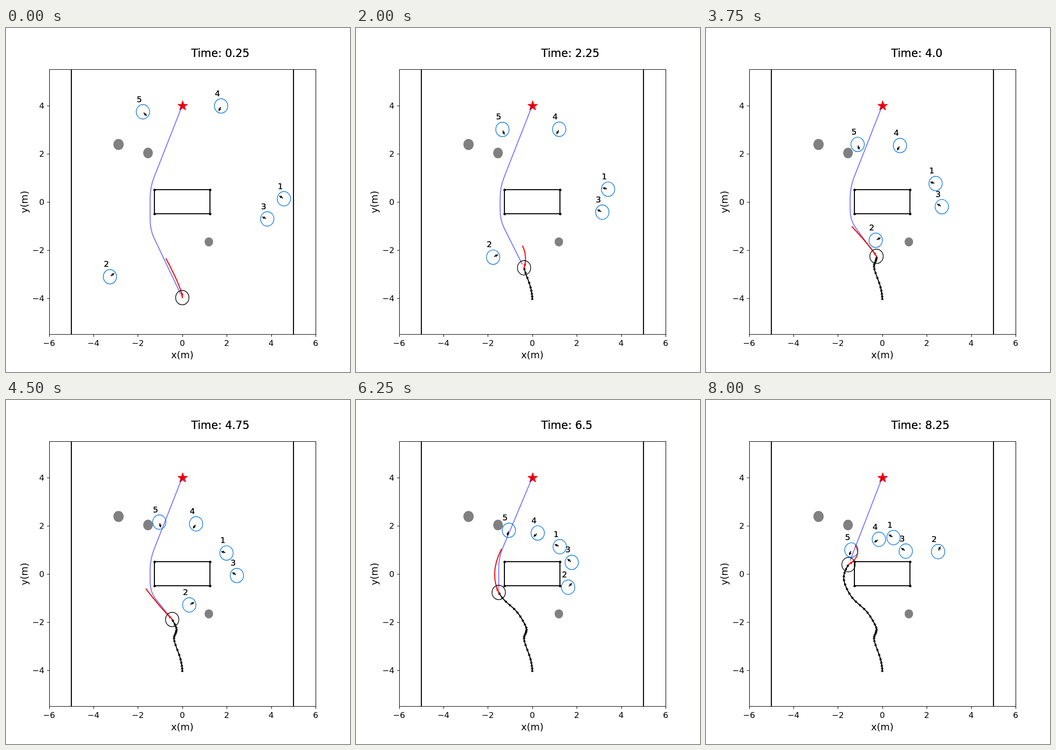
An HTML page that plays this animation: 700x700 px, repeating every 8250 ms.

```html
<!DOCTYPE html>
<html lang="en">
<head>
<meta charset="utf-8">
<title>Path planning</title>
<style>
  html, body { margin: 0; width: 100%; height: 100%; overflow: hidden; background: #fff; }
  svg { display: block; width: 700px; height: 700px; font-family: "DejaVu Sans", sans-serif; }
</style>
</head>
<body>
<svg viewBox="0 0 700 700">
  <g id="back"></g>
  <g id="scene"></g>
</svg>
<script>
const STEP = 250, COUNT = 33;
const SX = 45.208, SY = 49;
const px = x => 358.75 + x * SX;
const py = y => 353.5 - y * SY;
const snap = v => Math.floor(v + 0.5) + 0.5;
const fix = v => +v.toFixed(2);
const GOAL = [px(0), py(4)];
const FONT = 16.67;

// Curves through a few key points; every motion is a smooth spline in time.
const robotSteps = [0, 4, 8, 12, 16, 20, 24, 28, 32];
const robotKeys = [
  [358.8, 548.7], [354.5, 525], [342, 488], [346, 472.5], [345.5, 460.5],
  [327, 430.5], [296, 400.5], [280.3, 364], [290, 335]
];

const walkerSteps = [0, 3, 18, 25, 32];
const walkerKeys = [
  [[565.5, 347.5], [546, 337.3], [448.7, 311.3], [414.6, 298.5], [381.5, 280]],
  [[211.5, 506.2], [232.8, 491], [373, 417], [431.7, 381], [472.3, 308.5]],
  [[531.6, 388.5], [517.2, 382.5], [469.8, 357.2], [439, 330.4], [406.5, 307.5]],
  [[437.7, 158.7], [427.4, 180.5], [386.8, 252], [369.8, 270.6], [351.8, 283.5]],
  [[278.6, 170.5], [289, 184.2], [312, 248.5], [311, 265.2], [295.8, 305.3]]
];

// Bend and end of the planned curve, relative to the robot.
const planSteps = [0, 3, 8, 12, 18, 25, 32];
const planKeys = [
  [-1, -19, -33, -79], [-3, -10, -41, -90], [7, -24, -3, -44], [5, -15, -34, -58.5],
  [-30, -31, -53, -62], [-19, -41, 5.5, -88], [28, -18, 14, -39]
];

function spline(steps, keys, t) {
  const last = steps.length - 1;
  let k = 0;
  while (k < last - 1 && t > steps[k + 1]) k++;
  const d = steps[k + 1] - steps[k], u = (t - steps[k]) / d;
  return keys[k].map((v, j) => {
    const e = keys[k + 1][j] - v;
    const slope = i => (keys[i + 1][j] - keys[i - 1][j]) / (steps[i + 1] - steps[i - 1]) * d;
    const m0 = k ? slope(k) : (3 * e - slope(1)) / 2;
    const m1 = k + 1 < last ? slope(k + 1) : (3 * e - slope(k)) / 2;
    return v + u * (m0 + u * (3 * e - 2 * m0 - m1 + u * (m0 + m1 - 2 * e)));
  });
}

const angle = (a, b) => Math.atan2(b[1] - a[1], b[0] - a[0]) * 180 / Math.PI;

function toward(a, b, dist) {
  const f = Math.min(dist / (Math.hypot(b[0] - a[0], b[1] - a[1]) || 1), 1);
  return a.map((v, i) => fix(v + (b[i] - v) * f));
}

const path = (d, color, width, extra = "") =>
  `<path d="${d}" fill="none" stroke="${color}" stroke-width="${width}" ${extra}/>`;

const ellipse = ([x, y], rx, ry, attrs = "") =>
  `<ellipse cx="${fix(x)}" cy="${fix(y)}" rx="${fix(rx)}" ry="${fix(ry)}" ${attrs}/>`;

const ring = (pos, color) =>
  ellipse(pos, 0.3 * SX, 0.3 * SY, `fill="none" stroke="${color}" stroke-width="1.39"`);

const text = (x, y, size, str, extra = "") =>
  `<text x="${fix(x)}" y="${fix(y)}" font-size="${size}" ${extra}>${str}</text>`;

const polyline = pts => "M" + pts.map(p => p.map(fix).join()).join("L");

// Arrow along a heading, between two distances from its anchor.
function arrow([x, y], deg, from, to, color = "#000") {
  const neck = to - 6.5;
  return `<path transform="translate(${fix(x)} ${fix(y)}) rotate(${fix(deg)})" fill="${color}"
    d="M${from},-1H${neck + 1}L${neck},-3L${to},0L${neck},3L${neck + 1},1H${from}Z"/>`;
}

const trail = Array.from({ length: COUNT }, (_, i) => spline(robotSteps, robotKeys, i));

// Reference route: round the left side of the block, then on to the goal.
function route(pos, i) {
  if (pos[1] < 357) return polyline([toward(pos, GOAL, 10), GOAL]);
  const side = fix(Math.min(293.3, pos[0]));
  const low = [side, fix(391 + Math.max(0, 3 - i) * 6.5)];
  const high = [side, fix(324 - (293.3 - side) * 1.2)];
  const bend = (corner, next) =>
    `L${toward(corner, [side, 357], 22)}Q${corner} ${toward(corner, next, 22)}`;
  const finish = bend(high, GOAL) + "L" + GOAL.map(fix);
  if (pos[1] < low[1] + 22) return "M" + toward(pos, high, 9) + finish;
  return `M${toward(pos, low, 9)}L${toward(low, pos, 18)}Q${low} ${toward(low, high, 22)}` + finish;
}

function drawTrail(i) {
  if (!i) return "";
  const pts = [[358.75, 551], ...trail.slice(0, i + 1)];
  return path(polyline(pts), "#000", 2) +
    pts.slice(1).map((p, k) => arrow(p, angle(pts[k], p), -5, 2)).join("");
}

function drawPlan(pos, i) {
  const [bx, by, ex, ey] = spline(planSteps, planKeys, i).map(fix);
  return path(`M${pos.map(fix)}q${bx},${by} ${ex},${ey}`, "#f00", 2.08, 'stroke-linecap="square"') +
    arrow(pos, angle([0, 0], [bx, by]), 0, 11, "#f00");
}

function drawWalker(keys, k, i) {
  const at = t => spline(walkerSteps, keys, t);
  const pos = at(i);
  return ring(pos, "#0a78e0") + arrow(pos, angle(at(i - 0.5), at(i + 0.5)), 2.5, 12) +
    text(Math.round(pos[0] - 13), Math.round(pos[1] - 20), FONT, k + 1).repeat(2);
}

function drawAxes() {
  let ticks = "M88.5,84.5H630.5V623.5H88.5Z", labels = "";
  for (let v = -6; v <= 6; v += 2) {
    const name = v < 0 ? "\u2212" + -v : v;
    ticks += `M${snap(px(v))},623.5v5`;
    labels += text(px(v), 647, FONT, name, 'text-anchor="middle"');
    if (Math.abs(v) > 4) continue;
    ticks += `M88.5,${snap(py(v))}h-5`;
    labels += text(78, snap(py(v)) + 5.5, FONT, name, 'text-anchor="end"');
  }
  return path(ticks, "#000", 1.1) + labels +
    text(358.75, 672, 19.44, "x(m)", 'text-anchor="middle"') +
    text(0, 0, 19.44, "y(m)", 'text-anchor="middle" transform="translate(44 354) rotate(-90)"');
}

function drawStar() {
  const [cx, cy] = GOAL.map(snap);
  const pts = Array.from({ length: 10 }, (_, k) => {
    const a = (k / 5 - 0.5) * Math.PI, r = k % 2 ? 3.9 : 10.2;
    return [cx + r * Math.cos(a), cy + r * Math.sin(a)];
  });
  return `<path d="${polyline(pts)}Z" fill="#f00" stroke="#f00" stroke-width="1.39" stroke-linejoin="bevel"/>`;
}

function background() {
  let out = "";
  for (const [x, y, r] of [[229, 237, 0.232], [289, 254.3, 0.22], [412.8, 435.2, 0.19]])
    out += ellipse([x, y], r * SX, r * SY, 'fill="#808080"');
  out += path("M133,84V623M585,84V623M302,329H415V378H302Z", "#000", 2.08);
  for (const x of [-1.25, 1.25])
    for (const y of [-0.5, 0.5]) out += ellipse([snap(px(x)), snap(py(y))], 2.5, 2.5);
  return out + drawStar() + drawAxes();
}

function scene(i) {
  const pos = trail[i];
  const time = (i + 1) / 4;
  const stamp = Number.isInteger(time) ? time.toFixed(1) : time;
  return path(route(pos, i), "#00f", 2.08, 'stroke-opacity=".5" stroke-linecap="square"') +
    drawTrail(i) + drawPlan(pos, i) + ring(pos, "#000") +
    walkerKeys.map((keys, k) => drawWalker(keys, k, i)).join("") +
    text(377, 59, 22.22, "Time: " + stamp).repeat(2);
}

const layer = document.getElementById("scene");
document.getElementById("back").innerHTML = background();
const start = performance.now();
let shown = -1;

function render(now) {
  const i = Math.floor(Math.max(0, now - start) / STEP) % COUNT;
  if (i !== shown) {
    layer.innerHTML = scene(i);
    shown = i;
  }
  requestAnimationFrame(render);
}
render(start);
</script>
</body>
</html>
```
